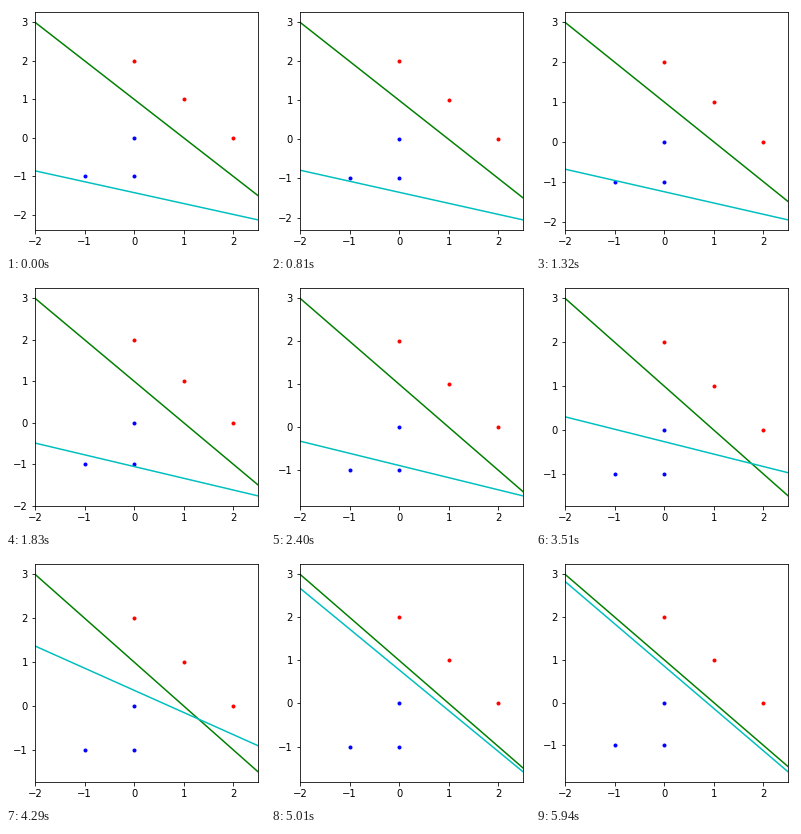
A matplotlib script for the animation above (6000 ms loop, 259x248 px).

```python
import numpy as np
import matplotlib.pyplot as plt
from matplotlib.animation import FuncAnimation

W, H, DPI = 259, 248, 72
FRAMES, STEP = 200, 30
X = np.array([-2, 2.5])

TURN = 139.25       # frame at which the boundary starts to tilt
LAST_SURGE = 121    # end of the surges during the climb
SURGE_PERIOD = 42


def settle(start, end, t, tau):
    """Exponential approach from start to end."""
    return end + (start - end) * np.exp(-t / tau)


def climb(n):
    """Accelerating intercept with periodic surges."""
    u = min(n, LAST_SURGE)
    surge = 1 - np.cos(2 * np.pi * (u - LAST_SURGE) / SURGE_PERIOD)
    return -1.42 + 8.3e-5 * n * n + 8e-6 * u * u * surge


def boundary_at(n):
    """Values of the learned boundary at both ends of the x axis."""
    t = max(n - TURN, 0)
    intercept = settle(climb(min(n, TURN)), .86, t, 13)
    slope = settle(-.283, -.992, t, 10)
    return intercept + slope * X


# The small surplus guards against rounding down to one pixel less
fig = plt.figure(figsize=((W + .01) / DPI, (H + .01) / DPI), dpi=DPI, facecolor="white")
ax = fig.add_axes([28.95 / W, 24.2 / H, 223.2 / W, 217.44 / H])
ax.set_xlim(*X)

ax.plot([0, 1, 2], [2, 1, 0], "r.")
ax.plot([0, 0, -1], [0, -1, -1], "b.")
ax.plot(X, 1 - X, "g")
boundary, = ax.plot(X, X, "c")


def update(n):
    y = boundary_at(n)
    boundary.set_data(X, y)
    low, high = min(-1.5, y.min()), 3
    pad = .05 * (high - low)
    ax.set_ylim(low - pad, high + pad)
    return boundary,


anim = FuncAnimation(fig, update, frames=FRAMES, interval=STEP,
                     repeat=True, repeat_delay=0, blit=False)
plt.show()
```
